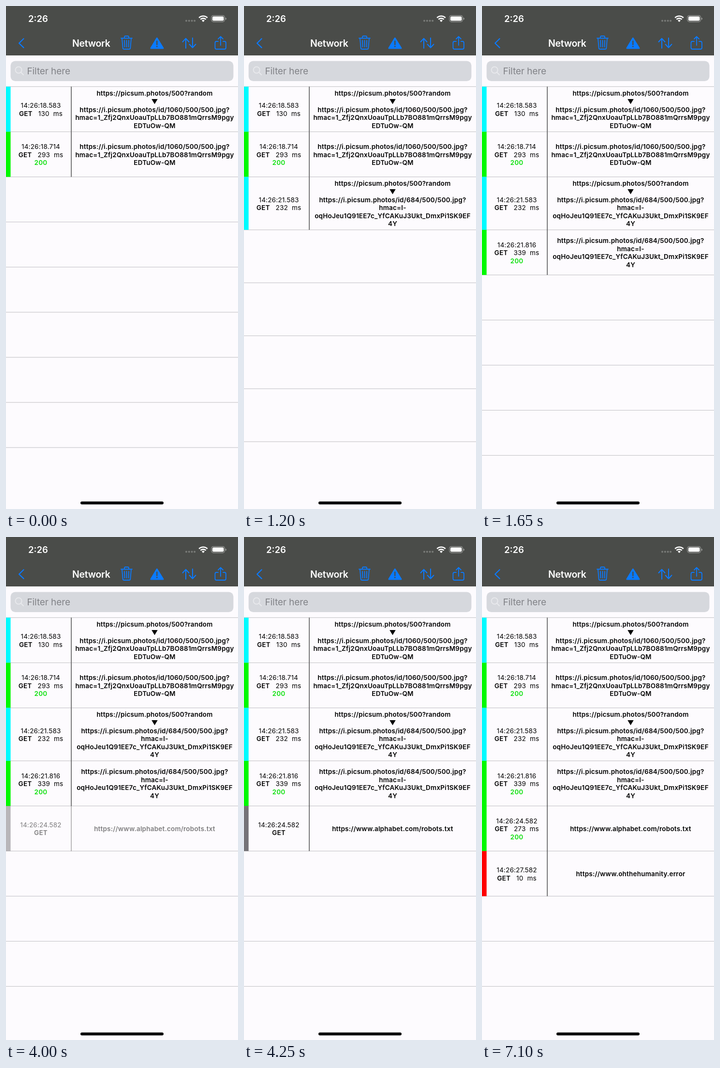
An HTML page that plays this animation: 480x1038 px, repeating every 8 s.

```html
<!DOCTYPE html>
<html lang="en">
<head>
<meta charset="utf-8">
<title>Network</title>
<style>
  html, body { margin: 0; height: 100%; overflow: hidden; background: #fdfbfe; }
  svg { display: block; width: 480px; height: 1038px; font-family: Inter, "Open Sans", sans-serif; }
  .cell { font-size: 13.5px; letter-spacing: .2px; text-anchor: middle; white-space: pre; }
  .b { font-weight: 600; }
  .ok { font-weight: 600; fill: #0be00b; }
  .icon { fill: none; stroke: #0a7aff; stroke-width: 2; stroke-linecap: round; stroke-linejoin: round; }
</style>
</head>
<body>
<svg viewBox="0 0 480 1038">
  <rect width="480" height="102" fill="#4a4c49"/>
  <text x="46" y="33" font-size="18.5" font-weight="600" fill="#fff">2:26</text>
  <g fill="#797b78">
    <circle cx="373" cy="30.5" r="2"/><circle cx="378.8" cy="30.5" r="2"/>
    <circle cx="384.6" cy="30.5" r="2"/><circle cx="390.2" cy="30.5" r="2"/>
  </g>
  <g fill="none" stroke="#fff" stroke-width="2.7">
    <path d="M399.3 24.3a12.4 12.4 0 0 1 17.4 0M402.4 27.6a8 8 0 0 1 11.2 0"/>
    <path d="M408 33l-3-3a4.3 4.3 0 0 1 6 0z" fill="#fff" stroke="none"/>
  </g>
  <rect x="425" y="19.6" width="27.5" height="13" rx="4" fill="none" stroke="#9b9c9a" stroke-width="1.2"/>
  <rect x="427" y="21.6" width="23.5" height="9" rx="2.3" fill="#fff"/>
  <path d="M454 23.8q2 .6 2 2.4t-2 2.4z" fill="#9b9c9a"/>

  <text x="137" y="83.5" font-size="19.5" letter-spacing="-.3" font-weight="600" fill="#fff">Network</text>
  <g class="icon">
    <path d="M36.5 67.5L27 76.7l9.5 9.2" stroke-width="2.2"/>
    <path d="M238 66.5h23M240 67l1.7 19.6q.2 2.4 2.6 2.4h10.4q2.4 0 2.6-2.4L259 67M245 66v-2q0-2 2-2h5q2 0 2 2v2M245 71l.5 13.5M249.5 71v13.5M254 71l-.5 13.5" stroke-width="1.8"/>
    <path d="M312.3 66.5L325 87H300z" fill="#0a7aff" stroke-width="3"/>
    <path d="M312.3 72.5v7" stroke="#4a4c49" stroke-width="2.4"/>
    <path d="M312.3 83.6v.1" stroke="#4a4c49" stroke-width="2.8"/>
    <path d="M372 87V67l-6.5 7M372 67l6.500 7M386 66v20l-6.500-7M386 86l6.500-7"/>
    <path d="M439 73h-3.500q-3 0-3 3v10q0 3 3 3h16.500q3 0 3-3V76q0-3-3-3H449M444 81V63l-5 5M444 63l5 5" stroke-width="1.8"/>
  </g>

  <rect x="9.500" y="113.500" width="461" height="41.500" rx="9.500" fill="#d6d8dd"/>
  <g fill="none" stroke="#e9eaed" stroke-width="1.8" stroke-linecap="round">
    <circle cx="26" cy="132" r="6.600"/><path d="M31 137l5 5"/>
  </g>
  <text x="43.500" y="141" font-size="19" letter-spacing="-.1" fill="#818287">Filter here</text>

  <g id="table"></g>
  <rect x="154" y="1022.500" width="172" height="6" rx="3"/>
</svg>
<script>
const TOP = 166.4, LOW = 93.1, TALL = 109.3, PITCH = 16.55;
const CYAN = '#00fbff', GREEN = '#00f900', GREY = '#757377', RED = '#ff0000';

const first = 'https://picsum.photos/500?random';
const photoA = ['https://i.picsum.photos/id/1060/500/500.jpg?', 'hmac=1_Zfj2QnxUoauTpLLb7BO881mQrrsM9pgy', 'EDTuOw-QM'];
const photoB = ['https://i.picsum.photos/id/684/500/500.jpg?', 'hmac=I-', 'oqHoJeu1Q91EE7c_YfCAKuJ3Ukt_DmxPi1SK9EF', '4Y'];
const robots = ['https://www.alphabet.com/robots.txt'];
const broken = ['https://www.ohthehumanity.error'];

const row = (bar, time, ms, lines, h = LOW) => ({ bar, time, ms, lines, h });
const r1 = row(CYAN, '14:26:18.583', 130, [first, '▼', ...photoA]);
const r2 = row(GREEN, '14:26:18.714', 293, photoA);
const wait3 = row(GREY, '14:26:21.583', 0, [first]);
const r3 = row(CYAN, '14:26:21.583', 232, [first, '▼', ...photoB], TALL);
const r4 = row(GREEN, '14:26:21.816', 339, photoB);
const wait5 = row(GREY, '14:26:24.582', 0, robots);
const r5 = row(GREEN, '14:26:24.582', 273, robots);
const wait6 = row(GREY, '14:26:27.582', 0, broken);
const r6 = row(RED, '14:26:27.582', 10, broken);

// start, rows, opacity of the last row, row it replaces
const steps = [
  [0, [r1, r2], 1],
  [1000, [r1, r2, wait3], .5],
  [1050, [r1, r2, wait3], 1],
  [1150, [r1, r2, r3], .5, wait3],
  [1200, [r1, r2, r3], 1],
  [1550, [r1, r2, r3, r4], .5],
  [1600, [r1, r2, r3, r4], .85],
  [1650, [r1, r2, r3, r4], 1],
  [4000, [r1, r2, r3, r4, wait5], .5],
  [4050, [r1, r2, r3, r4, wait5], .85],
  [4100, [r1, r2, r3, r4, wait5], 1],
  [7000, [r1, r2, r3, r4, r5, wait6], 1],
  [7050, [r1, r2, r3, r4, r5, r6], .5, wait6],
  [7100, [r1, r2, r3, r4, r5, r6], 1]
];

function block(lines, x, mid) {
  return lines.map((s, i) =>
    `<text class="cell" x="${x}" y="${mid + (i - (lines.length - 1) / 2) * PITCH + 5}">${s}</text>`).join('');
}

function drawRow(r, y, h, alpha) {
  const mid = y + h / 2 + .6;
  const info = [r.time, '<tspan class="b">GET</tspan>' + (r.ms ? `   ${r.ms}  ms` : '')];
  if (r.bar === GREEN) info.push('<tspan class="ok">200</tspan>');
  return `<g opacity="${alpha}"><rect y="${y}" width="9.5" height="${h}" fill="${r.bar}"/>
    <rect x="134.400" y="${y}" width="1.300" height="${h}" fill="#333"/>
    ${block(info, 72, mid)}<g class="b">${block(r.lines, 307.5, mid)}</g></g>`;
}

function drawTable([, rows, alpha, old]) {
  const last = rows.length - 1;
  let y = TOP, lines = '', cells = '';
  const rule = () => lines += `<rect y="${y - .6}" width="480" height="1.200" fill="#c9c8cc"/>`;
  rule();
  rows.forEach((r, i) => {
    if (i === last && old) cells += drawRow(old, y, r.h, 1 - alpha);
    cells += drawRow(r, y, r.h, i === last ? alpha : 1);
    y += r.h;
    rule();
  });
  // empty rows repeat the height of the last one
  while ((y += rows[last].h) < 1000) rule();
  return lines + cells;
}

const table = document.getElementById('table');
let shown;
function frame() {
  const t = performance.now() % 8000;
  const step = steps.findLast(s => s[0] <= t);
  if (step !== shown) table.innerHTML = drawTable(shown = step);
  requestAnimationFrame(frame);
}
frame();
</script>
</body>
</html>
```
